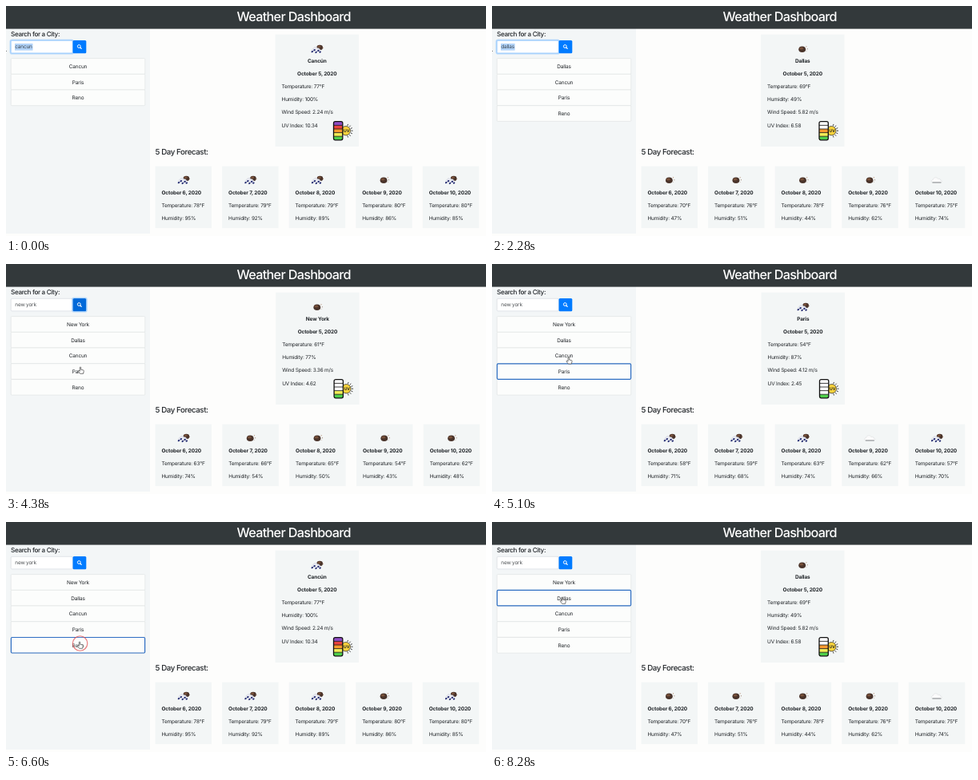
Write an HTML page that moves like this. It is 600 by 288 pixels and loops after 8.34 s.

```html
<!DOCTYPE html>
<html lang="en">
<head>
<meta charset="utf-8">
<title>Weather Dashboard</title>
<style>
  html, body { margin: 0; width: 100%; height: 100%; overflow: hidden; background: #fdfdfc; }
  svg { display: block; width: 100%; height: 100%; }
  text { font: 6.48px Inter, "Open Sans", sans-serif; letter-spacing: -.03em; fill: #212529; text-rendering: geometricPrecision; }
  .mid { text-anchor: middle; }
  .bold { font-weight: 700; letter-spacing: -.02em; }
  .head { font-weight: 500; letter-spacing: -.042em; }
</style>
</head>
<body>
<svg id="stage" viewBox="0 0 600 288"></svg>
<script>
const LOOP = 8340, STEP = 60;
const stage = document.getElementById('stage');

// icons: r rain, s clear, c cloud, f few clouds, m mist
const cities = {
  Cancun: { name: 'Cancún', x: 336.6, icon: 'r', temp: 77, hum: 100, wind: '2.24', uv: '10.34', level: 5,
    icons: 'rrrsr', temps: [78, 79, 79, 80, 80], hums: [95, 92, 89, 86, 85] },
  Dallas: { name: 'Dallas', x: 336.1, icon: 's', temp: 69, hum: 49, wind: '5.82', uv: '6.58', level: 3,
    icons: 'ssssc', temps: [70, 76, 78, 76, 75], hums: [47, 51, 44, 62, 74] },
  'New York': { name: 'New York', x: 337.2, gap: 83.8, icon: 's', temp: 61, hum: 77, wind: '3.36', uv: '4.62', level: 2,
    icons: 'rssss', temps: [63, 66, 65, 54, 62], hums: [74, 54, 50, 43, 48] },
  Paris: { name: 'Paris', x: 336.6, icon: 'r', temp: 54, hum: 87, wind: '4.12', uv: '2.45', level: 1,
    icons: 'rrrcr', temps: [58, 59, 63, 62, 57], hums: [71, 68, 74, 66, 70] },
  Reno: { name: 'Reno', x: 336.6, icon: 'm', temp: 76, hum: 8, wind: '5.82', uv: '5.96', level: 3,
    icons: 'ssssf', temps: [69, 62, 62, 57, 57], hums: [19, 26, 29, 38, 47] }
};

const shown = [[0, 'Cancun'], [1530, 'Dallas'], [3780, 'New York'], [4740, 'Paris'],
  [5760, 'Cancun'], [6660, 'Reno'], [7560, 'New York'], [8160, 'Dallas']];
const focus = [[0, 'input'], [1230, 'search'], [1800, 'input'], [3480, 'search'], [4440, 'Paris'],
  [5460, 'Cancun'], [6360, 'Reno'], [7270, 'New York'], [7860, 'Dallas']];
const clicks = [1230, 3480, 4440, 5460, 6360, 7270, 7860];
// time, x, y of the pointer tip
const path = [[0, -5, 51], [700, -5, 51], [1140, 97, 49], [1500, 97, 49], [1800, 36, 51], [2160, -5, 51],
  [2940, -5, 51], [3400, 96, 49], [3660, 96, 49], [4320, 93, 129], [4700, 93, 129], [5340, 97, 111],
  [5860, 97, 111], [6280, 92, 150], [6740, 92, 150], [7200, 89, 74], [7560, 89, 74], [7820, 88, 94], [LOOP, 88, 94]];

const at = (list, t) => list.filter(e => e[0] <= t).pop()[1];
const text = (x, y, s, cls = '', size = 6.48) =>
  `<text x="${x}" y="${y}" class="${cls}" style="font-size:${size}px">${s}</text>`;
const rect = (x, y, w, h, fill, more = '') =>
  `<rect x="${x}" y="${y}" width="${w}" height="${h}" fill="${fill}" ${more}/>`;
const circle = (x, y, r, fill, more = '') => `<circle cx="${x}" cy="${y}" r="${r}" fill="${fill}" ${more}/>`;
const line = (d, color, w) => `<path d="${d}" fill="none" stroke="${color}" stroke-width="${w}" stroke-linecap="round"/>`;
const move = (x, y, s) => `<g transform="translate(${x} ${y})">${s}</g>`;

const cloudPath = 'M-5 3C-8 3-7.5-.3-5-.4C-4.5-3.8 .3-4 1.2-1.6C3.4-2.4 4.6-1 4.4 .2C7 .3 6.8 3 4.5 3Z';
const cloud = (fill, edge) => `<path d="${cloudPath}" fill="${fill}" stroke="${edge}" stroke-width=".5"/>`;
const ball = (x, y, r) => `<ellipse cx="${x}" cy="${y}" rx="${r}" ry="${r * .86}" fill="#49332a"/>` +
  `<ellipse cx="${x - r * .2}" cy="${y - r * .3}" rx="${r * .55}" ry="${r * .35}" fill="#78513a"/>`;
const icons = {
  s: ball(-.6, .3, 4.4) + circle(4.6, -3.3, .55, '#a06a45') + circle(5.9, -.3, .55, '#8b6650') + circle(4.7, 2.4, .45, '#a98a76'),
  r: ball(3.4, -2, 3.8) + circle(7.4, -1.4, .5, '#8b5a3c') +
    `<g transform="translate(-.6 .2) scale(.85)">${cloud('#e9eaf1', '#c3c6d3')}</g>` +
    [[-6, 3.2], [-3.2, 1.2], [-1.2, 4], [1.6, 1.8], [3.8, 3.6]].map(([x, y]) =>
      `<ellipse cx="${x}" cy="${y}" rx="1.35" ry="1" fill="#20286f" transform="rotate(-30 ${x} ${y})"/>`).join(''),
  c: cloud('#fbfbfb', '#d5d7d8') + line('M-5.4 3H4.8', '#777b7e', .9),
  f: ball(3.2, -1.6, 3.3).replace('#49332a', '#45403d').replace('#78513a', '#5b534e') +
    `<g transform="translate(-1 1.2) scale(.85)">${cloud('#f1f1f0', '#c9caca')}</g>` +
    line('M-6 3.8H6.5', '#55585a', 1),
  m: [-4.4, -2.2, 0, 2.2, 4.4].map(y => line(`M-7 ${y}q1.8-1.3 3.5 0t3.5 0t3.5 0t3.5 0`, '#3f4345', .85)).join('')
};

function uvBadge(level) {
  const colors = ['#4fd04a', '#f3ee57', '#f79a2e', '#e8433f', '#8f4cc4'];
  const bars = colors.map((c, i) => rect(.8, 19.2 - i * 4.6, 11, 4.6, i < level ? c : '#fff') +
    (i ? line(`M1 ${23.8 - i * 4.6}H11.5`, '#111', .8) : '')).join('');
  let rays = '';
  for (let i = -3; i <= 3; i++) {
    const a = i * .42, c = Math.cos(a), s = Math.sin(a);
    rays += line(`M${16 + 7.1 * c} ${12.2 + 7.1 * s}L${16 + 8.3 * c} ${12.2 + 8.3 * s}`, '#222', .9);
  }
  return rays + circle(16, 12.2, 5.7, '#f9d33c', 'stroke="#222" stroke-width=".7"') + bars +
    rect(.7, .7, 11.3, 23.1, 'none', 'rx="2" stroke="#111" stroke-width="1.3"') +
    text(16.9, 14.2, 'UV', 'mid bold', 5);
}

function weather(c) {
  const { x } = c, mid = x + 52.2, left = x + 8;
  let out = rect(x, 35.6, 104.4, 140.4, '#f3f6f6') + move(mid, 54, icons[c.icon]) +
    text(mid, 70.9, c.name, 'mid bold') + text(mid, 87.1, 'October 5, 2020', 'mid bold') +
    text(left, 103, `Temperature: ${c.temp}°F`) + text(left, 119.2, `Humidity: ${c.hum}%`) +
    text(left, 135.4, `Wind Speed: ${c.wind} m/s`) + text(left, 151.6, `UV Index: ${c.uv}`) +
    move(x + 72.2, 144, uvBadge(c.level));
  for (let i = 0; i < 5; i++) {
    const cx = 186.6 + i * (c.gap || 83.55);
    out += rect(cx, 200.6, 70.4, 77.6, '#f3f6f6') + move(cx + 35.4, 218, icons[c.icons[i]]) +
      text(cx + 7.9, 235.9, `October ${6 + i}, 2020`, 'bold') +
      text(cx + 7.9, 252.1, `Temperature: ${c.temps[i]}°F`) + text(cx + 7.9, 268.3, `Humidity: ${c.hums[i]}%`);
  }
  return out;
}

function typed(t) {
  const type = (word, start, gap) => word.slice(0, Math.floor((t - start) / gap) + 1);
  if (t < 240) return 'cancun';
  if (t < 2640) return type('dallas', 240, 80);
  return type('new york', 2640, 85);
}

function sidebar(t) {
  const f = at(focus, t), inField = f === 'input';
  const selected = t < 240 ? 22.5 : t >= 1920 && t < 2640 ? 17.6 * Math.min(1, (t - 1860) / 240) : 0;
  const ring = (x, w) => rect(x - .6, 42.5, w + 1.2, 17.2, 'none', 'rx="2" stroke="#80bdff" stroke-opacity=".55" stroke-width="1.6"');
  let out = rect(0, 28, 180, 257, '#f3f6f7') + text(6, 38.2, 'Search for a City:', 'head', 8.1) +
    rect(6.2, 43.3, 77.3, 15.6, '#fff', `rx="1.5" stroke="${inField ? '#80bdff' : '#ced4da'}" stroke-width=".6"`) +
    (inField ? ring(6, 77.6) : '');
  if (selected) out += rect(selected < 17 ? 28.6 - selected : 11, 47, selected, 8.6, '#b2d3f8');
  out += text(11.3, 53.4, typed(t)).replace('<text', '<text fill-opacity=".8"') +
    rect(83.5, 43, 16.8, 16.2, f === 'search' ? '#0069d9' : '#007bff', 'rx="1.5"') +
    (f === 'search' ? ring(83.5, 16.8) : '') +
    circle(91.3, 50.5, 1.9, 'none', 'stroke="#fff" stroke-width="1"') + line('M92.8 52L94.2 53.4', '#fff', 1.2);

  const list = ['Cancun', 'Paris', 'Reno'];
  if (t >= 1530) list.unshift('Dallas');
  if (t >= 3780) list.unshift('New York');
  let active = '';
  list.forEach((name, i) => {
    const y = 65.6 + i * 19.7;
    out += rect(6.2, y, 167.6, 19.7, '#fcfdfc', 'rx="1" stroke="#dcdfe0" stroke-width=".6"') + text(90, y + 12.2, name, 'mid');
    if (name === f) active = rect(6.4, y + .1, 167.2, 19.5, 'none', 'rx="1.2" stroke="#2f6fc4" stroke-width="1.2"');
  });
  return out + active;
}

function pointer(t) {
  const i = path.findIndex(p => p[0] > t), [t0, x0, y0] = path[i - 1], [t1, x1, y1] = path[i];
  const p = (t - t0) / (t1 - t0), e = p * p * (3 - 2 * p);
  const x = x0 + (x1 - x0) * e, y = y0 + (y1 - y0) * e;
  let out = '';
  const start = clicks.find(c => t >= c && t < c + 400);
  if (start !== undefined) {
    const q = (t - start) / 400, r = 14 - 8 * q;
    out += circle(x + .6, y + 2, r, '#fff', `fill-opacity=".15" stroke="#e0464a" stroke-width="${1.5 - .6 * q}" stroke-opacity="${.9 - .3 * q}"`);
  }
  let shape = 'M-.7 .6C-.7-.3 .7-.3 .7 .6V3.2L3.6 3.9C4.3 4.2 4.4 4.7 4.2 5.6L3.6 8.3H-.4L-2.8 5.2C-2.8 4.2-1.6 4.3-.7 5.3Z';
  if (x < 6) shape = 'M0 0V7.6L1.9 6L3.1 8.7L4.3 8.2L3.1 5.5H5.6Z';
  else if (x < 83 && y > 43 && y < 59) return out + move(x, y, line('M-1 0H1M0 0V6.5M-1 6.5H1', '#333', .6));
  return out + move(x, y, `<path d="${shape}" fill="#fff" stroke="#333" stroke-width=".65" stroke-linejoin="round"/>`);
}

function render(t) {
  stage.innerHTML = rect(0, 0, 600, 288, '#fdfdfc') + sidebar(t) +
    rect(0, 0, 600, 28.6, '#33393b') +
    text(359.7, 19.2, 'Weather Dashboard', 'mid head', 16.2).replace('style="', 'style="fill:#fff;') +
    text(186.5, 185.6, '5 Day Forecast:', 'head', 9.72) +
    weather(cities[at(shown, t)]) + pointer(t);
}

let last = -1;
const origin = performance.now();
function tick() {
  const t = Math.floor(((performance.now() - origin) % LOOP) / STEP) * STEP;
  if (t !== last) render(last = t);
  requestAnimationFrame(tick);
}
tick();
</script>
</body>
</html>
```
